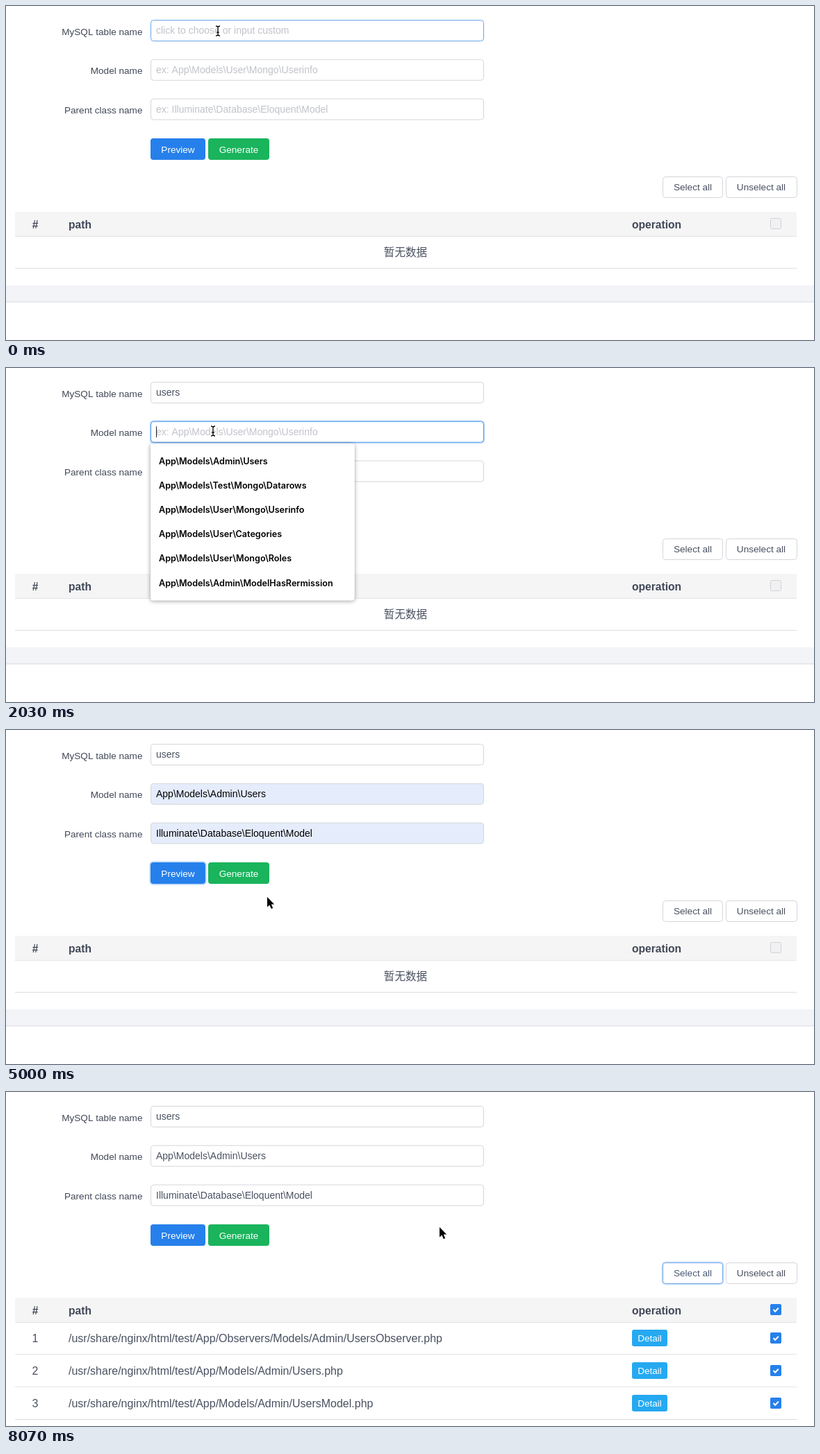
An HTML page with a canvas for the animation above (8110 ms loop, 1163 by 482 pixels).

```html
<!DOCTYPE html>
<html lang="en">
<head>
<meta charset="utf-8">
<title>Model generator form</title>
<style>
html, body { margin: 0; width: 100%; height: 100%; overflow: hidden; background: #fff; }
canvas { display: block; }
</style>
</head>
<body>
<canvas id="stage" width="1163" height="482"></canvas>
<script>
const ctx = document.getElementById('stage').getContext('2d');
const LOOP = 8110;
const SANS = '"Liberation Sans", Arial, sans-serif';
const UI = 'Inter, sans-serif';
const INK = '#495060', DARK = '#414857', HINT = '#c0c3ca';
const LINE = [212, 214, 219], BLUE = [70, 147, 236];

const TABLES = ['abilities', 'assigned_roles', 'failed_jobs', 'migrations',
  'password_resets', 'permissions', 'roles', 'users'];
const MODELS = ['App\\Models\\Admin\\Users', 'App\\Models\\Test\\Mongo\\Datarows',
  'App\\Models\\User\\Mongo\\Userinfo', 'App\\Models\\User\\Categories',
  'App\\Models\\User\\Mongo\\Roles', 'App\\Models\\Admin\\ModelHasRermission'];
const PARENTS = ['Illuminate\\Database\\Eloquent\\Model',
  'Jenssegers\\Mongodb\\Eloquent\\Model', '131', 'App\\Models\\User\\Mongo'];
const FILES = ['Observers/Models/Admin/UsersObserver', 'Models/Admin/Users', 'Models/Admin/UsersModel'];

// Moments of the story, in ms
const T = {
  open: 60, pickTable: 1000, close: 1310, focusModel: 1830, pickModel: 2730,
  focusParent: 3170, pickParent: 3740, preview: 4480, loaded: 6170,
  hoverAll: 6760, clickAll: 7140, checked: 7300, leaveAll: 7920
};

// Pointer stops: time, x, y
const PATH = [
  [0, 305, 36], [250, 305, 36], [830, 310, 325], [870, 310, 325], [1100, 307, 281.5],
  [1400, 307, 281.5], [1800, 298, 91], [2130, 298, 91], [2400, 302, 133], [2740, 302, 133],
  [3120, 304, 149], [3220, 304, 149], [3460, 310, 185], [3770, 310, 185], [4250, 251, 208],
  [4560, 251, 208], [4770, 376, 241], [6470, 376, 241], [6900, 987, 262], [7870, 987, 262],
  [8070, 624, 195], [LOOP, 624, 195]
];

const clamp = v => Math.max(0, Math.min(1, v));
const smooth = v => { v = clamp(v); return v * v * (3 - 2 * v); };
const during = (t, from, to, fade = 200) => smooth((t - from) / fade) - smooth((t - to) / fade);
const mix = (a, b, p) => `rgb(${a.map((v, i) => Math.round(v + (b[i] - v) * p))})`;

function pointerAt(t) {
  const i = Math.max(1, PATH.findIndex(p => p[0] > t));
  const [t0, x0, y0] = PATH[i - 1], [t1, x1, y1] = PATH[i];
  const p = smooth((t - t0) / (t1 - t0));
  return { x: x0 + (x1 - x0) * p, y: y0 + (y1 - y0) * p };
}

function text(str, x, y, { size = 13.6, color = INK, align = 'left', weight = 400, family = SANS } = {}) {
  ctx.font = `${weight} ${size}px ${family}`;
  ctx.textAlign = align;
  ctx.fillStyle = color;
  ctx.fillText(str, x, y);
}

function box(x, y, w, h, r, fill, stroke) {
  ctx.beginPath();
  ctx.roundRect(x, y, w, h, r);
  if (fill) { ctx.fillStyle = fill; ctx.fill(); }
  if (stroke) { ctx.strokeStyle = stroke; ctx.lineWidth = 1; ctx.stroke(); }
}

function rect(x, y, w, h, fill) {
  ctx.fillStyle = fill;
  ctx.fillRect(x, y, w, h);
}

function ring(x, y, w, h, level) {
  if (level <= 0) return;
  ctx.beginPath();
  ctx.roundRect(x - 1, y - 1, w + 2, h + 2, 5);
  ctx.lineWidth = 2;
  ctx.strokeStyle = `rgba(45,140,240,${0.25 * level})`;
  ctx.stroke();
}

// The shadow is clipped to the outside so that a fading panel stays white
function panel(x, y, w, h, blur, shade) {
  ctx.save();
  ctx.beginPath();
  ctx.rect(0, 0, 1163, 482);
  ctx.roundRect(x, y, w, h, 4);
  ctx.clip('evenodd');
  ctx.shadowColor = `rgba(0,0,0,${shade})`;
  ctx.shadowBlur = blur;
  ctx.shadowOffsetY = 1;
  box(x, y, w, h, 4, '#fff');
  ctx.restore();
  box(x, y, w, h, 4, '#fff');
}

function field(i, label, hint, s, mouse) {
  const y = 20.5 + 56.75 * i, base = y + 20;
  const hover = !s.covered && mouse.x > 208 && mouse.x < 688 && mouse.y > y && mouse.y < y + 30;
  text(label, 196.5, base + 1, { align: 'right', color: DARK });
  ring(208.5, y, 479, 30, s.focus);
  box(208.5, y, 479, 30, 4, s.fill || '#fff', mix(LINE, BLUE, Math.max(s.focus, hover ? 0.75 : 0)));
  if (s.ghost) text(s.value, 216, base - 0.5, { size: 11.8, color: '#000', family: UI });
  else text(s.value || hint, 216, base - 0.5, { size: 14, color: s.value ? s.color || INK : HINT });
  if (s.caret) rect(216, y + 7, 1, 16, '#222');
}

// State of a field that the browser fills in from its own suggestion list
function filled(t, value, start, pick, hovering) {
  const end = start === T.focusModel ? T.focusParent : T.preview;
  const s = { focus: during(t, start, end), caret: t >= start && t < pick };
  if (t >= pick) {
    s.value = value;
    if (t < T.loaded) { s.fill = '#e5ecfb'; s.color = '#000'; }
  } else if (hovering) {
    Object.assign(s, { value, ghost: true, fill: '#ecf1fc' });
  }
  return s;
}

function suggestions(items, y, w, hovering) {
  panel(208, y, w, items.length * 35.2 + 15, 6, 0.4);
  if (hovering) rect(208, y + 7.5, w, 35, '#cfd2d6');
  items.forEach((s, i) => text(s, 220, y + 29.5 + 35.2 * i, { size: 12.6, weight: 600, color: '#000', family: UI }));
}

function tableList(t, mouse) {
  const alpha = during(t, T.open, T.close, 300);
  if (alpha <= 0) return;
  const row = t > 830 ? 7 : Math.min(7, Math.floor((mouse.y - 60.6) / 28.75));
  ctx.save();
  ctx.globalAlpha = alpha;
  panel(208, 56, 480, 239.5, 6, 0.25);
  if (row >= 0) rect(208, 61 + 28.75 * row, 480, 28.75, '#f0f0f1');
  TABLES.forEach((s, i) => text(s, 224, 80 + 28.75 * i));
  ctx.restore();
}

function checkbox(y, enabled, on) {
  box(1100.5, y - 7.5, 15, 15, 2, enabled ? '#fff' : '#f1f1f1', '#cfd2d8');
  if (on <= 0) return;
  ctx.save();
  ctx.globalAlpha = on;
  box(1100, y - 8, 16, 16, 2, '#2680eb');
  ctx.strokeStyle = '#fff';
  ctx.lineWidth = 2;
  ctx.stroke(new Path2D(`M1104.5 ${y}l2.7 2.7l4.6-5`));
  ctx.restore();
}

function buttons(t) {
  ring(208, 191, 79, 31, during(t, T.preview, T.loaded));
  box(208, 191, 79, 31, 4, '#2680eb');
  text('Preview', 247.5, 211.5, { align: 'center', color: '#fff' });
  box(291, 191, 88, 31, 4, '#1ab45c');
  text('Generate', 335, 211.5, { align: 'center', color: '#fff' });

  const hover = during(t, T.hoverAll, T.leaveAll), focus = during(t, T.clickAll, LOOP);
  ring(945.5, 246.5, 86, 30, focus);
  box(945.5, 246.5, 86, 30, 4, '#fff', mix(LINE, BLUE, Math.max(hover, focus * 0.7)));
  text('Select all', 988.5, 266, { align: 'center', color: mix([73, 80, 96], BLUE, hover) });
  box(1036.5, 246.5, 102, 30, 4, '#fff', mix(LINE, BLUE, 0));
  text('Unselect all', 1087, 266, { align: 'center' });
}

function grid(t) {
  const loaded = t >= T.loaded, on = clamp((t - T.checked + 30) / 100);
  const head = { size: 15.6, weight: 700, color: DARK };
  rect(13, 297, 1125, 35, '#f5f5f6');
  rect(13, 332, 1125, 1, '#e3e5e9');
  text('#', 42, 321, { ...head, align: 'center' });
  text('path', 90, 321, head);
  text('operation', 901, 321, head);
  checkbox(314, loaded, on);

  if (!loaded) {
    text('暂无数据', 575, 361, { size: 15.6, align: 'center', family: '"Noto Sans CJK SC", "Noto Sans CJK", sans-serif' });
    rect(13, 378, 1125, 1, '#dcdee2');
    rect(0, 403, 1163, 24, '#f3f4f8');
    if (t >= T.open && t < T.close + 300) rect(13, 403, 1125, 24, '#fff');
    rect(0, 426.5, 1163, 1, '#d5d9e2');
    return;
  }
  FILES.forEach((file, i) => {
    const y = 355 + 47 * i;
    text(i + 1, 42, y + 6, { size: 16, align: 'center' });
    text(`/usr/share/nginx/html/test/App/${file}.php`, 90, y + 6, { size: 16 });
    box(901, y - 12, 51, 24, 3, '#25a9f1');
    text('Detail', 926.5, y + 5, { size: 13.5, align: 'center', color: '#fff' });
    checkbox(y, true, on);
    rect(13, y + 23, 1125, 1, i < 2 ? '#e3e5e9' : '#d5d8dd');
  });
}

const ARROW = new Path2D('M0 0V14.5L3.4 11.5L5.8 17L8.2 16L5.8 10.6H10.2Z');
const HAND = new Path2D('M-.5 .5C.5-.2 1.8.3 2 1.5L2.7 6C3.5 5.2 4.8 5.5 5 6.5C5.9 5.9 7 6.3 7.2 7.2' +
  'C8.2 6.8 9.3 7.4 9.3 8.6C9.4 11 8.8 13 7.8 15V17H1.5C1 15-1.5 12.5-3.8 10C-4.4 9-3 8.2-2 8.8L0 10.2L-1 2C-1.1 1.3-1 .8-.5 .5Z');
const FINGERS = new Path2D('M2.3 10.5V14M4.4 10.5V14M6.5 10.5V14');
const BEAM = new Path2D('M-3-7Q0-7 0-5Q0-7 3-7M0-5V5M-3 7Q0 7 0 5Q0 7 3 7M-1.7 2H1.7');

function pointerKind(t, { x, y }, listed) {
  if (t > T.open + 100 && t < T.close + 300 && y > 56 && y < 296) return 'hand';
  if (x > 208 && x < 379 && y > 191 && y < 222) return 'hand';
  if (x > 945 && x < 1032 && y > 246 && y < 277) return 'hand';
  const onField = x > 208 && x < 688 && [20, 77, 133].some(top => y > top && y < top + 31);
  return onField && !listed ? 'beam' : 'arrow';
}

function drawPointer(kind, { x, y }) {
  const paint = (path, color, width) => {
    ctx.strokeStyle = color;
    ctx.lineWidth = width;
    ctx.stroke(path);
  };
  ctx.save();
  ctx.translate(x, y);
  ctx.lineJoin = 'round';
  if (kind === 'beam') {
    paint(BEAM, '#fff', 3);
    paint(BEAM, '#000', 1.3);
  } else if (kind === 'hand') {
    ctx.fillStyle = '#fff';
    ctx.fill(HAND);
    paint(HAND, '#000', 1.2);
    paint(FINGERS, '#000', 0.8);
  } else {
    paint(ARROW, '#fff', 2.2);
    ctx.fillStyle = '#000';
    ctx.fill(ARROW);
  }
  ctx.restore();
}

function draw(t) {
  const mouse = pointerAt(t);
  const modelList = t >= T.focusModel + 60 && t < T.pickModel;
  const parentList = t >= T.focusParent + 40 && t < T.pickParent;
  const onModel = modelList && mouse.y > 116.5, onParent = parentList && mouse.y > 173;

  rect(0, 0, 1163, 482, '#fff');
  field(0, 'MySQL table name', 'click to choose or input custom',
    { focus: during(t, T.open, T.focusModel), value: t >= T.pickTable ? 'users' : '' }, mouse);
  field(1, 'Model name', 'ex: App\\Models\\User\\Mongo\\Userinfo',
    { ...filled(t, MODELS[0], T.focusModel, T.pickModel, onModel), covered: t < T.close + 300 }, mouse);
  field(2, 'Parent class name', 'ex: Illuminate\\Database\\Eloquent\\Model',
    { ...filled(t, PARENTS[0], T.focusParent, T.pickParent, onParent), covered: t < T.pickModel }, mouse);
  buttons(t);
  grid(t);
  tableList(t, mouse);
  if (modelList) suggestions(MODELS, 109, 293.5, onModel);
  if (parentList) suggestions(PARENTS, 166, 270, onParent);
  drawPointer(pointerKind(t, mouse, onModel || onParent), mouse);
}

const start = performance.now();
(function tick() {
  draw((performance.now() - start) % LOOP);
  requestAnimationFrame(tick);
})();
</script>
</body>
</html>
```
